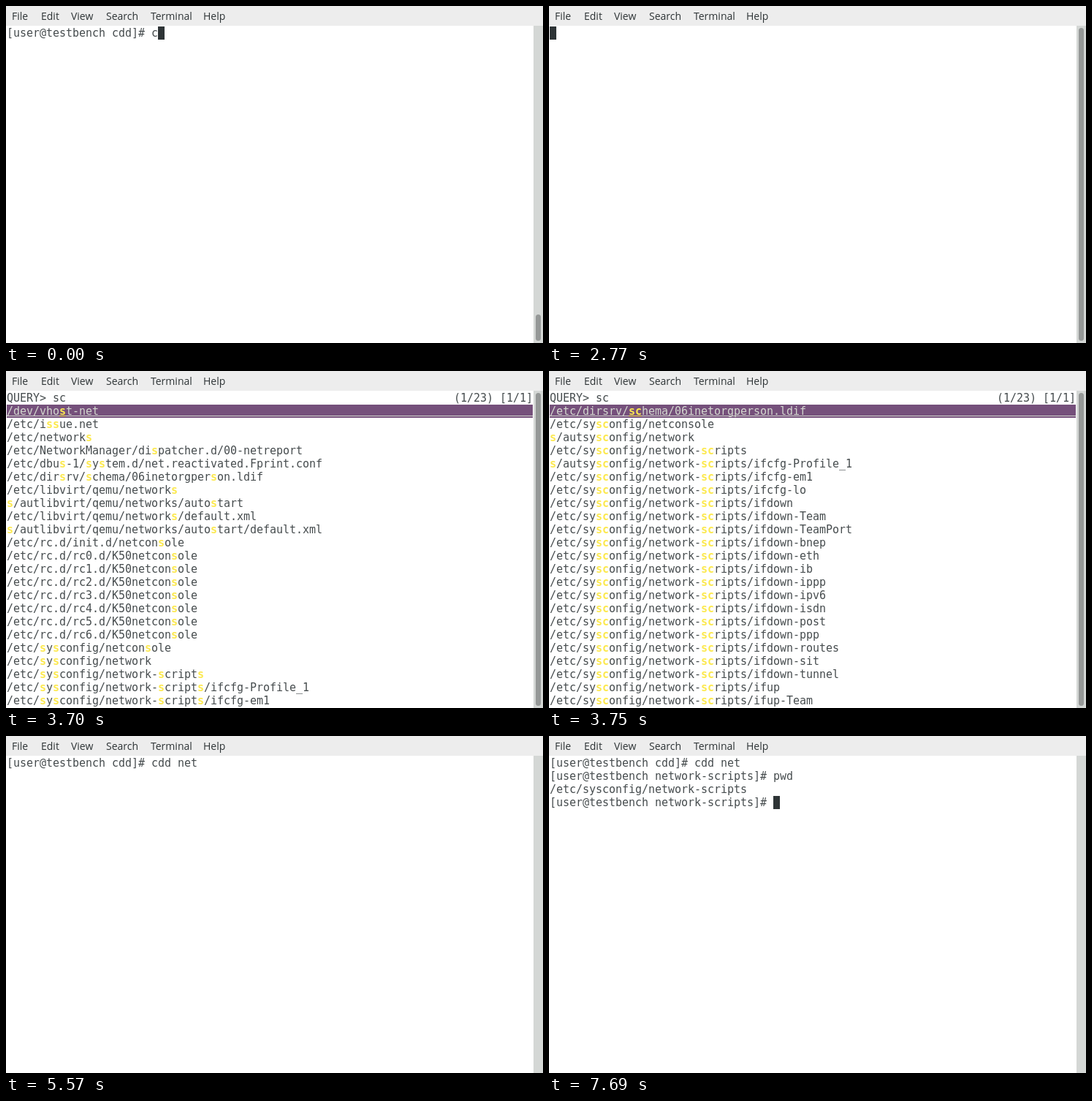
An HTML page with a canvas that plays this animation: 735 px wide and 461 px high, repeating every 8 s.

```html
<!DOCTYPE html>
<html>
<head>
<meta charset="utf-8">
<style>
  html, body { margin: 0; height: 100%; overflow: hidden; background: #fff; }
  canvas { display: block; }
</style>
</head>
<body>
<canvas width="735" height="461"></canvas>
<script>
const ctx = document.querySelector('canvas').getContext('2d');
const DURATION = 8000, CELL = 9, LINE = 18, TOP = 28;
const INK = '#2e3436', TEXT = '#464c4e', YELLOW = '#fce94f', PURPLE = '#75507b', PALE = '#d3d7cf';

const PROMPT = '[user@testbench cdd]# ';
const NEW_PROMPT = '[user@testbench network-scripts]# ';
const SCRIPTS = '/etc/sysconfig/network-scripts';

const expand = (prefix, names) => names.split(' ').map(name => prefix + name);

const scriptFiles = [
  ...expand(SCRIPTS + '/', 'ifcfg-Profile_1 ifcfg-em1 ifcfg-lo ifdown'),
  ...expand(SCRIPTS + '/ifdown-',
    'Team TeamPort bnep eth ib ippp ipv6 isdn post ppp routes sit tunnel'),
  ...expand(SCRIPTS + '/', 'ifup ifup-Team ifup-TeamPort ifup-aliases ifup-bnep'),
];
const sysconfig = ['/etc/sysconfig/netconsole', '/etc/sysconfig/network', SCRIPTS, ...scriptFiles];
const allPaths = [
  '/boot/grub2/i386-pc/net.mod',
  ...expand('/dev/', 'net network_latency network_throughput vhost-net net/tun'),
  ...expand('/etc/', 'auto.net issue.net netconfig networks xinetd.d ' +
    'NetworkManager/dispatcher.d/00-netreport dbus-1/system.d/net.reactivated.Fprint.conf ' +
    'dirsrv/schema/06inetorgperson.ldif'),
  ...expand('/etc/libvirt/qemu/networks',
    ' /autostart /default.xml /autostart/default.xml'),
  ...expand('/etc/rc.d/init.d/', 'netconsole network'),
  ...[0, 1, 2, 3, 4, 5, 6].flatMap(n =>
    expand(`/etc/rc.d/rc${n}.d/`, 'K50netconsole K90network')),
  ...sysconfig,
];

// The terminal redraws imperfectly: some rows keep stray leading characters.
const stray = (paths, pattern, text) => paths.map(p => p.replace(pattern, text));
const listS = stray(allPaths.filter(p => p.includes('s')), /^\/etc\/(?=.*\/auto)/, 's/aut');
const listSc = stray(['/etc/dirsrv/schema/06inetorgperson.ldif', ...sysconfig],
  /^\/etc\/(?=sysconfig\/(network$|.*Profile))/, 's/aut');
const listScr = stray([SCRIPTS, ...scriptFiles], /^\/etc\/(?=.*Profile)/, 's/aut');
const listScri = [SCRIPTS, ...stray(listScr.slice(1), /^./, 'i')];

function rect(x, y, w, h, color) {
  ctx.fillStyle = color;
  ctx.fillRect(x, y, w, h);
}

function write(col, row, text, color = TEXT, bold = false) {
  ctx.font = `${bold ? 'bold ' : ''}15px "DejaVu Sans Mono", monospace`;
  ctx.fillStyle = color;
  [...text].forEach((ch, i) =>
    ctx.fillText(ch, 1 + (col + i) * CELL, TOP + 14 + row * LINE));
}

function underline(col, row, length, color) {
  rect(1 + col * CELL, TOP + row * LINE + 15, length * CELL, 1, color);
}

function thumb(top) {
  ctx.fillStyle = '#959897';
  ctx.beginPath();
  ctx.roundRect(725, top, 7, 458 - top, 3.5);
  ctx.fill();
}

function chrome() {
  rect(0, 0, 735, 461, '#fff');
  rect(0, 0, 735, 27, '#ededed');
  rect(722, 27, 13, 434, '#d4d7d5');
  ctx.font = '14px "Open Sans", sans-serif';
  ctx.fillStyle = INK;
  const menu = { File: 8, Edit: 48, View: 89, Search: 137, Terminal: 198, Help: 270 };
  for (const label in menu) ctx.fillText(label, menu[label], 19);
}

const shell = (lines, cursorCol, cursorRow, thumbTop) => () => {
  lines.forEach((line, row) => write(0, row, line));
  if (cursorCol >= 0) rect(1 + cursorCol * CELL, TOP + cursorRow * LINE, CELL, LINE, INK);
  if (thumbTop) thumb(thumbTop);
};

const typing = text => shell([PROMPT + text], PROMPT.length + text.length, 0, 422);

const finder = (query, paths, mark, selectedMark = mark) => () => {
  write(0, 0, 'QUERY> ' + query);
  write(68, 0, '(1/23) [1/1]');
  rect(1, TOP + LINE, 80 * CELL, LINE, PURPLE);
  underline(0, 1, 80, PALE);
  paths.slice(0, 23).forEach((path, i) => {
    const selected = i === 0;
    let col = 0;
    path.split(selected ? selectedMark : mark).forEach((part, k) => {
      const hit = k % 2 === 1;
      write(col, i + 1, part, hit ? YELLOW : selected ? PALE : TEXT, hit);
      if (hit && selected) underline(col, 1, part.length, YELLOW);
      col += part.length;
    });
  });
  thumb(30);
};

const markS = /(s(?!\/autos))/, markSc = /(^s|sc)/, markScr = /(^s|scr)/;
const done = PROMPT + 'cdd net';
const pwd = NEW_PROMPT + 'pwd';
const end = NEW_PROMPT.length;

const timeline = [
  [0, typing('c')],
  [230, typing('cd')],
  [400, typing('cdd')],
  [1420, typing('cdd ')],
  [1770, typing('cdd n')],
  [1830, typing('cdd ne')],
  [2140, typing('cdd net')],
  [2740, shell([done], 0, 1, 422)],
  [2770, shell([], 0, 0, 30)],
  [2870, finder('', allPaths)],
  [3410, finder('s', allPaths)],
  [3460, finder('s', listS, markS)],
  [3700, finder('sc', listS, markS)],
  [3750, finder('sc', listSc, markSc)],
  [4380, finder('scr', listSc, markSc)],
  [4430, finder('scr', listScr, markScr)],
  [4510, finder('scri', listScr, markScr)],
  [4560, finder('scri', listScri, /(^i|scr)/, /(scri)/)],
  [5570, shell([done], -1)],
  [5670, shell([done, NEW_PROMPT], end + 1, 1)],
  [6340, shell([done, NEW_PROMPT + 'p'], end + 1, 1)],
  [6480, shell([done, NEW_PROMPT + 'pw'], end + 2, 1)],
  [6890, shell([done, pwd], end + 3, 1)],
  [7590, shell([done, pwd], 0, 2)],
  [7690, shell([done, pwd, SCRIPTS, NEW_PROMPT], end, 3)],
];

function render() {
  const t = performance.now() % DURATION;
  chrome();
  timeline.findLast(([start]) => start <= t)[1]();
  requestAnimationFrame(render);
}
render();
</script>
</body>
</html>
```
